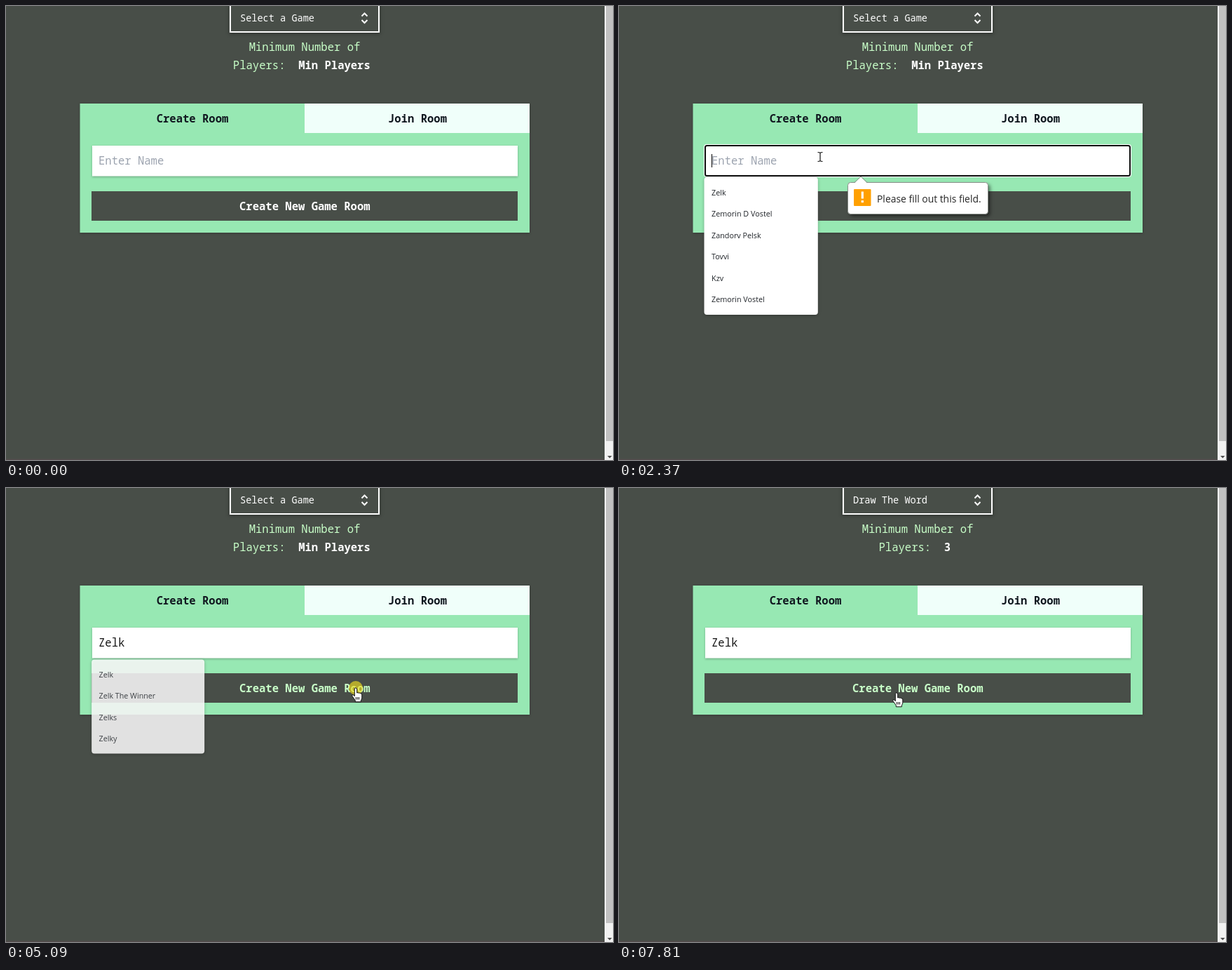
An HTML page with a canvas that plays this animation: 866 px wide and 647 px high, repeating every 8000 ms.

```html
<!DOCTYPE html>
<html lang="en">
<head>
<meta charset="utf-8">
<title>Game room form</title>
<style>
html, body { margin: 0; width: 100%; height: 100%; overflow: hidden; background: #484e48; }
canvas { display: block; }
</style>
</head>
<body>
<canvas id="stage" width="866" height="647"></canvas>
<script>
const c = document.getElementById('stage').getContext('2d');
const LOOP = 8000;
const DARK = '#484e48', GREEN = '#97e8b3', MINT = '#f0fffa', PALE = '#c8ffc8', INK = '#111820';
const MONO = '"Noto Sans Mono", "DejaVu Sans Mono", monospace';
const SANS = '"Open Sans", "Noto Sans", sans-serif';
const BIG = '15.55px ' + MONO, BOLD = 'bold ' + BIG, SMALL = '13.6px ' + MONO;
const CHAR = 9.33;

const people = ['Zelk', 'Zemorin D Vostel', 'Zandorv Pelsk', 'Tovvi', 'Kzv',
  'Zemorin Vostel', 'Zelk The Winner', 'Zelks', 'Zelky'];
const games = ['Draw The Word', 'game 1', 'game 2', 'game 4'];

// [time, text in the name field]
const typing = [[0, ''], [3040, 'K'], [3110, 'KZ'], [3330, 'K'], [3400, ''],
  [3540, 'Z'], [3830, 'Ze'], [4030, 'Zel'], [4100, 'Zelk']];
// [time, x, y]
const path = [[70, 766, 599], [390, 530, 279], [1000, 530, 279], [1450, 285, 215],
  [1510, 285, 215], [1910, 287, 215], [4630, 287, 215], [4960, 499, 285],
  [5700, 499, 285], [5830, 560, 296], [5960, 614, 210], [6290, 450, 12],
  [6740, 450, 12], [6820, 447, 36], [7080, 440, 62], [7430, 440, 62], [7800, 396, 292]];
const clicks = [[660, 800], [2240, 2370], [5020, 5170], [6490, 6620], [7350, 7480]];
const bubbleFade = [[720, 0], [880, 1], [3040, 1], [3110, .13], [3180, 0]];
const listFade = [[2240, 0], [2370, 1], [3040, 1], [3110, .55], [3190, 0],
  [3540, 0], [3640, 1], [5030, 1], [5090, .86], [5200, 0]];
const menuFade = [[6490, 0], [6600, 1], [7380, 1], [7480, 0]];

const hand = new Path2D('M0,0q1.7,0 1.7,2v5q1.5,-1 2.6,.3q1.5,-.8 2.5,.5q2,-.5 2,2v4q0,2 -1.5,4v2h-8v-2l-4.5,-6.5q-.6,-2 1.5,-1.6l2,2v-10q0,-2 1.7,-2z');
const arrow = new Path2D('M0,0V16L4,12.5L6.5,18L9,17L6.5,11.5H11.5z');
const beam = new Path2D('M-3.5,-6.5q3,0 3.5,1q.5,-1 3.5,-1M0,-5.5V5.5M-3.5,6.5q3,0 3.5,-1q.5,1 3.5,1');

// Linear interpolation through [time, ...values] points
function at(points, t) {
  let i = points.findIndex(p => p[0] > t);
  if (i === 0) return points[0].slice(1);
  if (i < 0) return points[points.length - 1].slice(1);
  const a = points[i - 1], b = points[i], k = (t - a[0]) / (b[0] - a[0]);
  return a.slice(1).map((v, n) => v + (b[n + 1] - v) * k);
}

function box(x, y, w, h, fill, r = 0) {
  c.fillStyle = fill;
  c.beginPath();
  c.roundRect(x, y, w, h, r);
  c.fill();
}

function text(str, x, y, font, fill, align = 'left') {
  c.font = font;
  c.fillStyle = fill;
  c.textAlign = align;
  c.fillText(str, x, y);
}

function line(d, color, width) {
  c.strokeStyle = color;
  c.lineWidth = width;
  c.stroke(new Path2D(d));
}

function shadow(color, blur, x, y) {
  c.shadowColor = color;
  c.shadowBlur = blur;
  c.shadowOffsetX = x;
  c.shadowOffsetY = y;
}

// Draws with an opacity and restores all state afterwards
function layer(alpha, draw) {
  if (alpha <= 0) return;
  c.save();
  c.globalAlpha = alpha;
  draw();
  c.restore();
}

function drawHeader(t) {
  const asked = t >= 5300, chosen = t >= 7420;
  c.save();
  shadow('rgba(0,0,0,.3)', 5, 0, 2);
  box(318, -8, 216, 46, DARK);
  c.restore();
  c.strokeStyle = '#fff';
  c.lineWidth = 2;
  c.strokeRect(320, -8, 212, 45);
  text(chosen ? games[0] : asked ? 'Please Select a Ga…' : 'Select a Game', 334, 21.5, SMALL, '#fff');
  line('M507.5,14.5l4,-4l4,4M507.5,20l4,4l4,-4', '#fff', 2);

  const value = chosen ? '3' : asked ? 'Please' : 'Min Players';
  const left = 426.5 - (11 + value.length) * CHAR / 2;
  text('Minimum Number of', 426, 64, BIG, PALE, 'center');
  text('Players:', left, 89.5, BIG, PALE);
  text(value, left + 10 * CHAR, 89.5, BOLD, '#fff');
  if (asked && !chosen) text('Select a Game', 426, 115, BOLD, '#fff', 'center');
}

function drawField(t) {
  const focused = t >= 700 && t < 5030;
  const [since, value] = typing.filter(p => p[0] <= t).pop();
  c.save();
  if (!focused) shadow('rgba(0,0,0,.25)', 3, 0, 1);
  box(focused ? 121 : 123, focused ? 197 : 199, focused ? 610 : 607, focused ? 47 : 43.5, '#fff', focused ? 4 : 0);
  c.restore();
  if (focused) {
    c.strokeStyle = '#101010';
    c.lineWidth = 2;
    c.beginPath();
    c.roundRect(123, 199, 606, 43, 2.5);
    c.stroke();
  }
  text(value || 'Enter Name', 132, 225.5, BIG, value ? '#151515' : '#9ca3af');
  const blinkFrom = since || (t < 2300 ? 700 : 2300);
  if (focused && Math.floor((t - blinkFrom) / 530) % 2 === 0)
    box(132 + value.length * CHAR, 211, 1, 19, '#000');
}

function drawPanel(t, hover) {
  c.save();
  shadow('rgba(0,0,0,.25)', 4, 0, 1);
  box(105.5, 139, 641.5, 184, GREEN);
  c.restore();
  box(426, 139, 321, 42, MINT);
  text('Create Room', 266, 165.5, BOLD, INK, 'center');
  text('Join Room', 587, 165.5, BOLD, INK, 'center');
  drawField(t);
  box(122, 264, 608, 42, DARK);
  text('Create New Game Room', 426.3, 290.5, BOLD, hover ? PALE : '#fff', 'center');
}

function drawBubble() {
  c.save();
  shadow('rgba(0,0,0,.5)', 5, 3, 3);
  box(326.5, 251.5, 200, 45, '#fff', 4);
  c.restore();
  c.strokeStyle = '#8a8f8a';
  c.lineWidth = 1;
  c.beginPath();
  c.roundRect(326.5, 251.5, 200, 45, 4);
  c.stroke();
  c.fillStyle = '#fff';
  c.fill(new Path2D('M336,252.5L345,243.5L354,252.5z'));
  line('M336,251.5L345,243L354,251.5', '#8a8f8a', 1);
  box(335, 261, 24.5, 24, '#ffa000', 1);
  box(345.7, 264.5, 3.2, 10, '#fff');
  box(345.7, 277, 3.2, 3.2, '#fff');
  text('Please fill out this field.', 368, 280, '13.9px ' + SANS, '#252525');
}

function drawSuggestions(t, alpha) {
  const prefix = t < 3300 ? '' : typing.filter(p => p[0] <= t).pop()[1];
  const names = people.filter(n => n.startsWith(prefix)).slice(0, 6);
  const h = names.length * 30.4 + 13.5, scale = .945 + .055 * alpha;
  c.translate(202.7, 244 + h / 2);
  c.scale(scale, scale);
  c.translate(-202.7, -244 - h / 2);
  c.save();
  shadow('rgba(0,0,0,.3)', 4, 0, 1);
  box(121.5, 244, 162.3, h, '#fff', 4);
  c.restore();
  names.forEach((n, i) => text(n, 132, 270 + i * 30.4, '10.8px ' + SANS, '#1f2328'));
}

function drawMenu(x, y) {
  c.save();
  shadow('rgba(0,0,0,.3)', 10, 0, 3);
  box(319, 42, 214, 160.5, MINT);
  c.restore();
  games.forEach((name, i) => {
    const top = 46 + i * 38;
    if (y >= top && y < top + 38) box(319, top, 214, 38, GREEN);
    text(name, 361.5, top + 24, SMALL, INK);
  });
}

function drawCursor(x, y, kind, pressed) {
  c.save();
  c.translate(x, y);
  if (pressed) {
    c.fillStyle = 'rgba(240,220,30,.65)';
    c.beginPath();
    c.arc(0, 0, 10, 0, 7);
    c.fill();
  }
  c.strokeStyle = '#111';
  c.lineWidth = 1;
  if (kind === beam) {
    c.lineWidth = 1.2;
  } else {
    c.fillStyle = '#fff';
    c.fill(kind);
  }
  c.stroke(kind);
  if (kind === hand) c.stroke(new Path2D('M2.4,13v3.5M4.5,13v3.5M.3,13v3.5'));
  c.restore();
}

function drawScrollbar() {
  box(854, 0, 12, 647, '#f1f1f1');
  box(856, 0, 10, 620, '#c1c1c1');
  c.fillStyle = '#505050';
  c.fill(new Path2D('M858,641h6.5l-3.2,3.5z'));
}

function render(t) {
  const [x, y] = at(path, t);
  const shift = t >= 5300 && t < 7420 ? 25.4 : 0;
  const shown = t >= 70;
  const menu = at(menuFade, t)[0];
  const inside = (l, top, r, b) => shown && x >= l && x <= r && y >= top && y <= b;
  // The hover state outlives the layout jump for a moment
  const held = t >= 5300 && t < 5500;
  const hover = held || inside(122, 264 + shift, 730, 306 + shift);
  const pointer = hover || inside(319, 0, 533, 38) || menu > 0 && inside(319, 38, 533, 202)
    || inside(105, 139 + shift, 747, 181 + shift);
  const kind = pointer ? hand : inside(122, 198 + shift, 730, 243 + shift) ? beam : arrow;

  box(0, 0, 866, 647, DARK);
  box(0, 645.5, 854, 1.5, '#534c4c');
  drawHeader(t);
  c.save();
  c.translate(0, shift);
  drawPanel(t, hover);
  c.restore();
  layer(at(bubbleFade, t)[0], drawBubble);
  const list = at(listFade, t)[0];
  layer(list, () => drawSuggestions(t, list));
  layer(menu, () => drawMenu(x, y));
  drawScrollbar();
  if (shown) drawCursor(x, y, kind, clicks.some(([a, b]) => t >= a && t < b));
}

const start = performance.now();
function frame() {
  render((performance.now() - start) % LOOP);
  requestAnimationFrame(frame);
}
frame();
</script>
</body>
</html>
```
